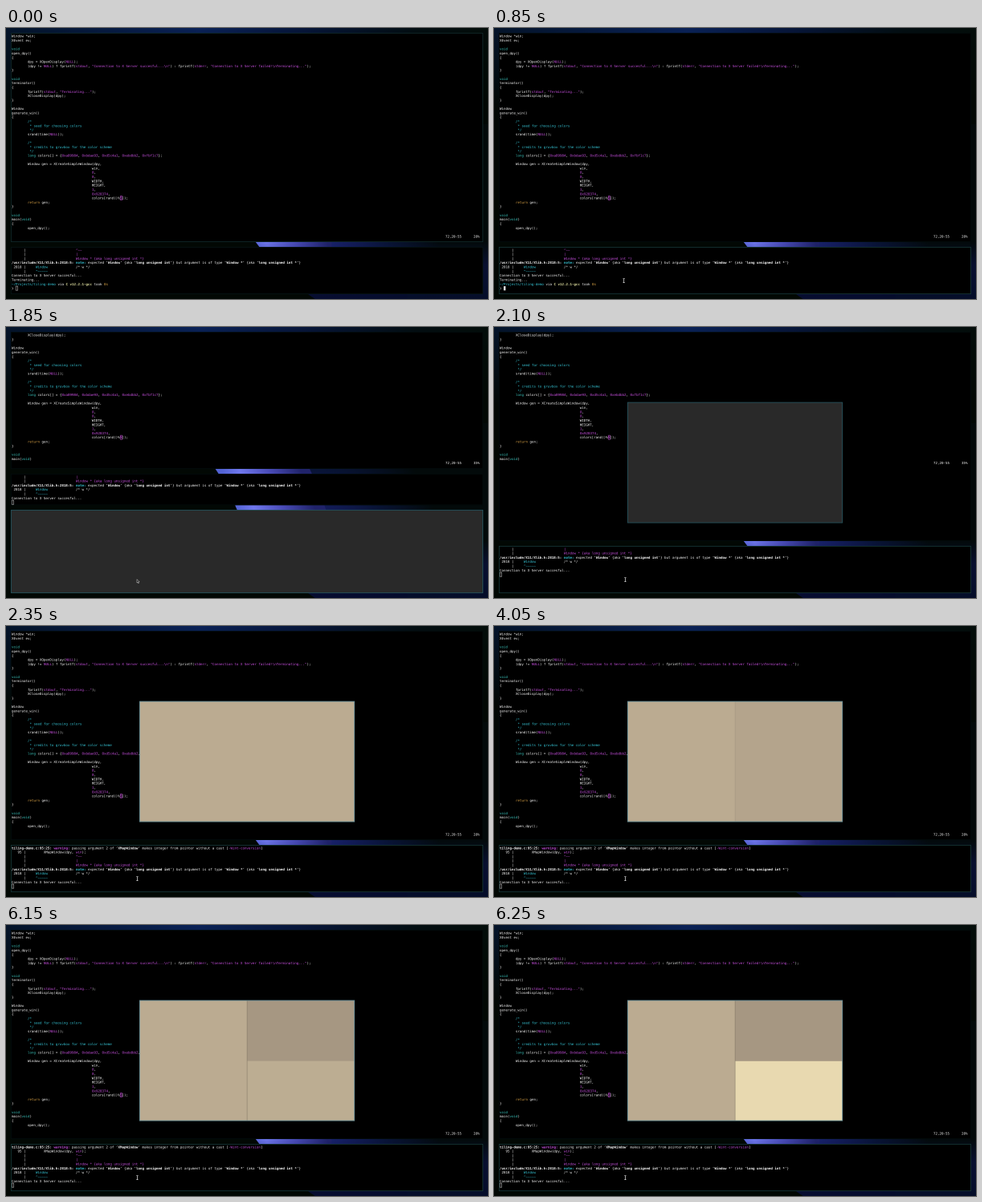
Animation of 600x338 px, one loop 8000 ms. Source, as an HTML page with a canvas:

```html
<!DOCTYPE html>
<html lang="en">
<head>
<meta charset="utf-8">
<title>Tiling demo</title>
<style>
html, body { margin: 0; width: 100%; height: 100%; overflow: hidden; background: #020804; }
canvas { display: block; width: 600px; height: 338px; }
</style>
</head>
<body>
<canvas id="stage" width="1200" height="676"></canvas>
<script>
const ctx = document.getElementById("stage").getContext("2d");
const LOOP = 8000, STEP = 50;
const CW = 2.5, LH = 5.3125, LEFT = 7;
const FONT = '4.15px "DejaVu Sans Mono", "Liberation Mono", monospace';
const INK = {
  w: "#ffffff", m: "#cc52e4", c: "#38cbdc", t: "#3cc8c0",
  g: "#e6e6a4", y: "#e0a848", d: "#c0c0c0"
};

const source = `Window *win;
XEvent ev;

void
open_dpy()
{
        dpy = XOpenDisplay(NULL);
        (dpy != NULL) ? fprintf(stdout, "Connection to X Server succesful...\\n") : fprintf(stderr, "Connection to X Server failed!\\nTerminating...");
}

void
terminator()
{
        fprintf(stdout, "Terminating...");
        XCloseDisplay(dpy);
}

Window
generate_win()
{
        /*
         * seed for choosing colors
         */
        srand(time(NULL));

        /*
         * credits to gruvbox for the color scheme
         */
        long colors[] = {0xa89984, 0xbdae93, 0xd5c4a1, 0xebdbb2, 0xfbf1c7};

        Window gen = XCreateSimpleWindow(dpy,
                                        win,
                                        0,
                                        0,
                                        WIDTH,
                                        HEIGHT,
                                        1,
                                        0x928374,
                                        colors[rand()%5]);
        return gen;
}

void
main(void)
{
        open_dpy();`.split("\n");
const CURSOR_ROW = 38, CURSOR_COL = 54;

// "§" plus a letter switches ink; a capital letter means bold.
const gap = n => " ".repeat(n);
const bar = "§w      |";
const build = [
  "§Wtiling-demo.c:95:25: §Mwarning: §wpassing argument 2 of ‘§WXMapWindow§w’ makes integer from pointer without a cast [§m-Wint-conversion§w]",
  "§w   95 |" + gap(9) + "XMapWindow(dpy, §mwin§w);",
  bar + gap(25) + "§m^~~",
  bar + gap(25) + "§m|",
  bar + gap(25) + "§mWindow * {aka long unsigned int *}",
  "§W/usr/include/X11/Xlib.h:2818:5: §Cnote: §wexpected ‘§WWindow§w’ {aka ‘§Wlong unsigned int§w’} but argument is of type ‘§WWindow *§w’ {aka ‘§Wlong unsigned int *§w’}",
  "§w 2818 |" + gap(5) + "§cWindow" + gap(14) + "§w/* w */",
  bar + gap(5) + "§c^~~~~~",
  "§wConnection to X Server succesful..."
];
const idle = build.slice(2).concat(
  "§wTerminating...",
  "§c~/Projects/tiling-demo§w via §GC v12.2.1-gcc§w took §y8s",
  "§d❯"
);

const clamp = v => Math.max(0, Math.min(1, v));
const ramp = (t, a, b) => clamp((t - a) / (b - a));
const ease = v => 1 - (1 - v) ** 3;

function text(str, col, y, ink, bold) {
  ctx.font = (bold ? "bold " : "") + FONT;
  ctx.fillStyle = INK[ink];
  ctx.fillText(str, LEFT + col * CW, y);
}

function codeInk(word) {
  if (/^("|\d|NULL|std)/.test(word)) return "m";
  if (/^(void|long)$/.test(word)) return "t";
  return word === "return" ? "y" : "w";
}

function codeLine(line, y) {
  const start = line.search(/\S/);
  if (start < 0) return;
  if (/^\s+[\/*]/.test(line)) return text(line.trim(), start, y, "c");
  const parts = /"[^"]*"|\b(?:0x\w+|\d+|NULL|stdout|stderr|void|long|return)\b|(?:(?!"|\b(?:0x\w+|\d+|NULL|stdout|stderr|void|long|return)\b).)+/g;
  for (const m of line.matchAll(parts)) text(m[0], m.index, y, codeInk(m[0]));
}

function richLine(line, y) {
  let col = 0;
  for (const part of line.split("§").slice(1)) {
    const key = part[0], str = part.slice(1), ink = key.toLowerCase();
    text(str, col, y, ink, key !== ink);
    col += str.length;
  }
}

function block(col, y, filled, ink) {
  const x = LEFT + col * CW;
  ctx.fillStyle = ctx.strokeStyle = ink;
  ctx.lineWidth = 0.5;
  if (filled) ctx.fillRect(x, y - 4.1, CW, LH);
  else ctx.strokeRect(x + 0.2, y - 4.1, CW, LH - 0.2);
}

function pane(top, bottom, border, draw) {
  ctx.save();
  ctx.fillStyle = "#000";
  ctx.fillRect(6, top, 588, bottom - top);
  ctx.beginPath();
  ctx.rect(6, top, 588, bottom - top);
  ctx.clip();
  draw(top);
  ctx.restore();
  ctx.strokeStyle = border;
  ctx.lineWidth = 0.7;
  ctx.strokeRect(6.4, top + 0.4, 587.2, bottom - top - 0.8);
}

function editor(top, first, rows, percent) {
  const base = top + 5.5;
  source.slice(first, first + rows).forEach((line, i) => codeLine(line, base + i * LH));
  block(CURSOR_COL, base + (CURSOR_ROW - first) * LH, false, "#c050d0");
  const y = base + rows * LH;
  text("72,20-55", 216, y, "w");
  text(percent, 230, y, "w");
}

function shell(top, lines, col, row, filled) {
  const base = top + 5.3;
  lines.forEach((line, i) => richLine(line, base + i * LH));
  block(col, base + row * LH, filled, "#d8d8d8");
}

function stops(g, list) {
  list.forEach(([at, color]) => g.addColorStop(at, color));
  return g;
}
const linear = (x0, y0, x1, y1, ...list) => stops(ctx.createLinearGradient(x0, y0, x1, y1), list);
const radial = (x, y, r, ...list) => stops(ctx.createRadialGradient(x, y, 0, x, y, r), list);

function paint(style) {
  ctx.fillStyle = style;
  ctx.fillRect(0, 0, 600, 338);
}

function wallpaper() {
  paint("#020804");
  ctx.save();
  ctx.beginPath();
  ctx.rect(0, 0, 600, 100);
  ctx.clip();
  paint(linear(0, 0, 600, 0, [0, "#04142a"], [0.4, "#0a2258"], [0.62, "#07163a"], [0.85, "#030e12"], [1, "#030d0a"]));
  paint(linear(0, 0, 0, 100, [0, "rgba(2,8,4,0)"], [1, "#020804"]));
  ctx.restore();

  ctx.save();
  ctx.beginPath();
  ctx.moveTo(225, 120);
  ctx.quadraticCurveTo(247, 158, 260, 176);
  ctx.quadraticCurveTo(276, 200, 285, 222);
  ctx.bezierCurveTo(300, 258, 335, 305, 385, 338);
  ctx.lineTo(600, 338);
  ctx.lineTo(600, 120);
  ctx.clip();
  paint(radial(375, 275, 165, [0, "#1f2a80"], [0.3, "#141d5c"], [0.6, "#091436"], [1, "#030a0a"]));

  // bright fold between the left edge and a softer right one
  ctx.beginPath();
  ctx.moveTo(225, 120);
  ctx.lineTo(350, 120);
  ctx.bezierCurveTo(385, 190, 412, 240, 404, 290);
  ctx.quadraticCurveTo(360, 276, 310, 292);
  ctx.lineTo(200, 200);
  ctx.closePath();
  ctx.fillStyle = linear(290, 262, 390, 225,
    [0.08, "#5363d4"], [0.28, "#7078ee"], [0.6, "#4a4cb8"], [0.95, "#20236a"]);
  ctx.fill();
  paint(linear(0, 266, 0, 338, [0, "rgba(12,22,78,0)"], [0.4, "rgba(12,20,72,.6)"], [1, "rgba(5,14,44,.9)"]));
  for (let i = 0; i < 3; i++) {
    const y = 272 + i * 11;
    ctx.beginPath();
    ctx.moveTo(300, y + 6);
    ctx.bezierCurveTo(350, y - 5, 400, y + 14, 500, y + 6);
    ctx.lineTo(500, 338);
    ctx.lineTo(300, 338);
    ctx.fillStyle = "rgba(8,12,48,.2)";
    ctx.fill();
  }
  ctx.restore();
}

function tile(x, y, w, h, color, alpha) {
  if (alpha <= 0) return;
  ctx.globalAlpha = alpha;
  ctx.fillStyle = color;
  ctx.fillRect(x, y, w, h);
  ctx.globalAlpha = 1;
}

function frameBox(x, y, w, h, color, alpha = 1) {
  ctx.globalAlpha = alpha;
  ctx.strokeStyle = color;
  ctx.lineWidth = 0.9;
  ctx.strokeRect(x, y, w, h);
  ctx.globalAlpha = 1;
}

function floating(t) {
  tile(166, 94, 268, 150, "#292929", 1);
  tile(166, 94, 268, 150, "#bbab91", ramp(t, 2100, 2300));
  const right = ramp(t, 4000, 4150), low = ramp(t, 6100, 6250);
  tile(300, 94, 134, 150, "#a69782", right);
  tile(300, 169.3, 134, 75, "#e8d9b0", low);
  tile(299.8, 94, 0.6, 150, "#857a69", right);
  tile(300, 169, 134, 0.6, "#928374", low);
  frameBox(166.4, 94.1, 267.3, 150, t < 2150 ? "#24505a" : "#628a94");
}

function ibeam(x, y) {
  ctx.strokeStyle = "#e8e8e8";
  ctx.lineWidth = 0.7;
  ctx.beginPath();
  ctx.moveTo(x, y - 2.4);
  ctx.lineTo(x, y + 2.4);
  for (const d of [-2.5, 2.5]) {
    ctx.moveTo(x - 1.2, y + d);
    ctx.lineTo(x + 1.2, y + d);
  }
  ctx.stroke();
}

function arrow(x, y) {
  ctx.beginPath();
  [[0, 0], [0, 4.4], [1, 3.5], [1.7, 5], [2.4, 4.7], [1.8, 3.2], [3.1, 3.1]]
    .forEach(([dx, dy]) => ctx.lineTo(x + dx, y + dy));
  ctx.closePath();
  ctx.fillStyle = "#101010";
  ctx.fill();
  ctx.strokeStyle = "#e0e0e0";
  ctx.lineWidth = 0.5;
  ctx.stroke();
}

function pointer(t) {
  if (t < 550) return;
  if (t >= 1500 && t < 2100) return arrow(163, 314.7);
  const k = ease(ramp(t, 550, 850));
  ibeam(t < 1200 ? 172 - 10.3 * k : 163.4, 290 + 25.2 * k);
}

function render(t) {
  const split = t >= 1500 && t < 2100;
  const reflowed = t >= 1600 && t < 2150;
  const moved = ramp(t, 550, 850);
  const focus = split ? 0 : moved;
  const border = k => `rgb(${4 + 22 * k},${14 + 50 * k},${15 + 50 * k})`;

  wallpaper();
  pane(6.2, split ? 177 : 267, border(0.7 * (1 - moved)), top =>
    reflowed ? editor(top, 14, 30, "35%") : editor(top, 0, 47, "28%"));
  pane(split ? 183 : 273, split ? 222.3 : 332, border(0.2 + 0.8 * focus - (split ? 0.2 : 0)), top => {
    if (t < 1200) shell(top, idle, 2, 9, t >= 600);
    else if (t < 1350) shell(top, idle.slice(1), 0, 9, true);
    else if (reflowed) shell(top, build.slice(3), 0, 6, false);
    else shell(top, build, 0, 9, t < 1500);
  });
  if (split) {
    const fade = ramp(t, 1550, 1850);
    tile(6, 228, 588, 104, "#292929", fade);
    frameBox(6.4, 228.4, 587.2, 103.2, "#24505a", fade);
  }
  if (t >= 2100) floating(t);
  pointer(t);
}

ctx.scale(2, 2);
ctx.textBaseline = "alphabetic";
ctx.textRendering = "geometricPrecision";
const begin = performance.now();
let shown = -1;

function tick() {
  const t = Math.floor(((performance.now() - begin) % LOOP) / STEP) * STEP;
  if (t !== shown) render(shown = t);
  requestAnimationFrame(tick);
}
tick();
</script>
</body>
</html>
```
